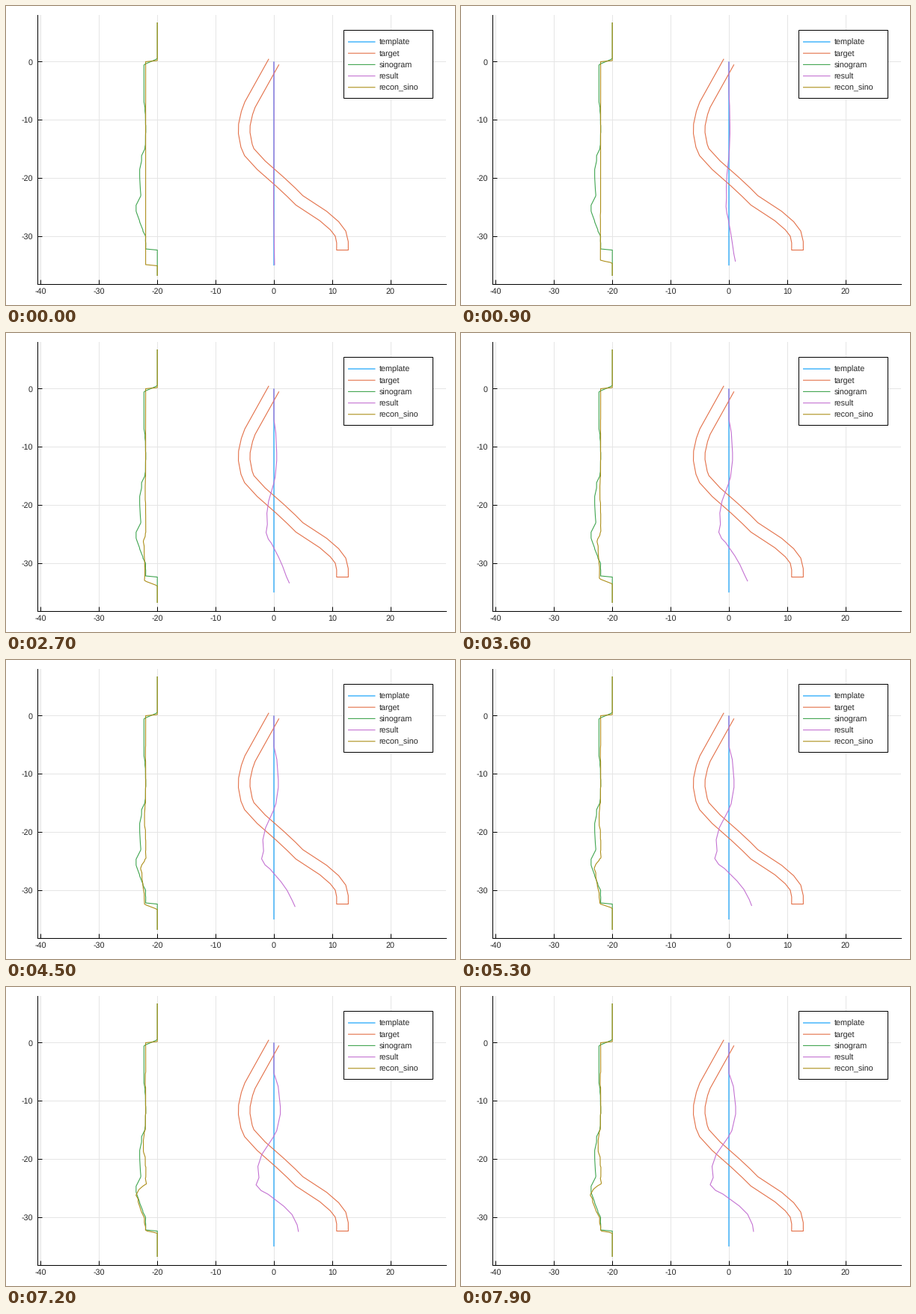
These frames come from a looping animation (600 by 400 pixels, 8000 ms). A matplotlib script:

```python
import numpy as np
import matplotlib.pyplot as plt
from matplotlib.animation import FuncAnimation
from matplotlib.patches import Rectangle

W, H, DPI = 600, 400, 100
STEP, FRAMES = 100, 80
PX = 72 / DPI
LEFT, RIGHT, TOP, BOTTOM = 42, 588, 12, 372
X0, Y0, UNIT = 358, 74.5, 7.79
LENGTH = 35 * UNIT
INK = "#262626"

plt.rcParams.update({
    "font.family": "Liberation Sans",
    "font.size": 10.8 * PX,
    "text.hinting": "none",
    "text.color": INK,
})

COLORS = {
    "template": "#009afa",
    "target": "#e36f47",
    "sinogram": "#3ea44e",
    "result": "#c371d2",
    "recon_sino": "#ac8e18",
}

# Centre lines: the bent target, and the pose the template ends up in.
TARGET = np.array([
    (X0, Y0), (326, 132), (322, 143), (318.5, 159), (318.3, 170),
    (321.5, 187), (325, 195.5), (341, 213), (366, 235), (381, 249),
    (392, 260), (424, 281), (439, 294), (447, 304.5), (449.6, 316),
    (449.6, 326.5),
])
FINAL = np.array([
    (X0, Y0), (X0, 115), (364, 133), (367, 160), (367, 170), (362, 192),
    (357, 201), (341, 224), (335.5, 240), (337, 255), (333, 264.5),
    (340, 272), (350, 277), (372, 293), (383, 304), (389.5, 318),
    (391, 327.5),
])

# The straight start pose: the part below the kink gets pulled upwards.
REST_Y = np.interp(FINAL[:, 1], [Y0, 255, 327.5], [Y0, 257, Y0 + LENGTH])
REST = np.column_stack([np.full(len(FINAL), X0), REST_Y])
DEPTH = (REST_Y - Y0) / LENGTH

ROWS = np.arange(22, 361.5, 1.5)


def spine(i):
    """Centre line at step i; the free end settles sooner than the rest."""
    u = (i + 1) / FRAMES
    gain = 1 - (1 - u) ** (1.25 + 1.05 * DEPTH ** 16)
    return REST + gain[:, None] * (FINAL - REST)


def ribbon(line):
    """Outline two units wide around a centre line."""
    d = np.gradient(line, axis=0)
    d /= np.hypot(d[:, 0], d[:, 1])[:, None]
    side = UNIT * np.column_stack([-d[:, 1], d[:, 0]])
    return np.vstack([line + side, (line - side)[::-1]])


def projection(outline):
    """Horizontal thickness of an outline on each row, drawn from x = -20."""
    x1, y1 = outline.T
    x2, y2 = np.roll(outline, -1, axis=0).T
    dy = np.where(y1 == y2, 1, y2 - y1)
    y = ROWS[:, None]
    hit = (np.minimum(y1, y2) <= y) & (y < np.maximum(y1, y2))
    x = x1 + (x2 - x1) * (y - y1) / dy
    width = np.abs(np.sum(hit * np.sign(dy) * x, axis=1))
    return np.column_stack([X0 - 20 * UNIT - width, ROWS])


fig = plt.figure(figsize=(W / DPI, H / DPI), dpi=DPI, facecolor="white")
ax = fig.add_axes([LEFT / W, 1 - BOTTOM / H,
                   (RIGHT - LEFT) / W, (BOTTOM - TOP) / H])
ax.set_xlim(LEFT, RIGHT)
ax.set_ylim(BOTTOM, TOP)
ax.set_axisbelow(True)
ax.grid(color="#e5e5e5", lw=PX)
for side in ("top", "right"):
    ax.spines[side].set_visible(False)
for side in ("left", "bottom"):
    ax.spines[side].set_linewidth(PX)

xs = range(-40, 21, 10)
ys = range(-30, 1, 10)
ax.set_xticks([X0 + UNIT * v for v in xs], [str(v) for v in xs])
ax.set_yticks([Y0 - UNIT * v for v in ys], [str(v) for v in ys])
ax.tick_params(direction="in", length=6 * PX, width=PX, labelcolor=INK)
ax.tick_params(axis="x", pad=5 * PX)
ax.tick_params(axis="y", pad=6 * PX)


def draw(name, pts, z=3):
    x, y = np.transpose(pts)
    return ax.plot(x, y, color=COLORS[name], lw=1.1 * PX, zorder=z,
                   snap=False, solid_capstyle="butt")[0]


target = ribbon(TARGET)
draw("template", [(X0, Y0), (X0, Y0 + LENGTH)])
draw("target", target)
draw("sinogram", projection(target))
result = draw("result", spine(0))
recon = draw("recon_sino", projection(ribbon(spine(0))))

ax.add_patch(Rectangle((451, 32), 119, 91, fc="white", ec="black",
                       lw=PX, zorder=5))
for i, name in enumerate(COLORS):
    y = 48 + 15.2 * i
    draw(name, [(457, y), (493.5, y)], z=6)
    ax.text(498.5, y + 4, name, va="baseline", zorder=6)


def update(i):
    line = spine(i)
    result.set_data(*line.T)
    recon.set_data(*projection(ribbon(line)).T)
    return result, recon


anim = FuncAnimation(fig, update, frames=FRAMES, interval=STEP,
                     repeat=True, repeat_delay=0, blit=False)
plt.show()
```
